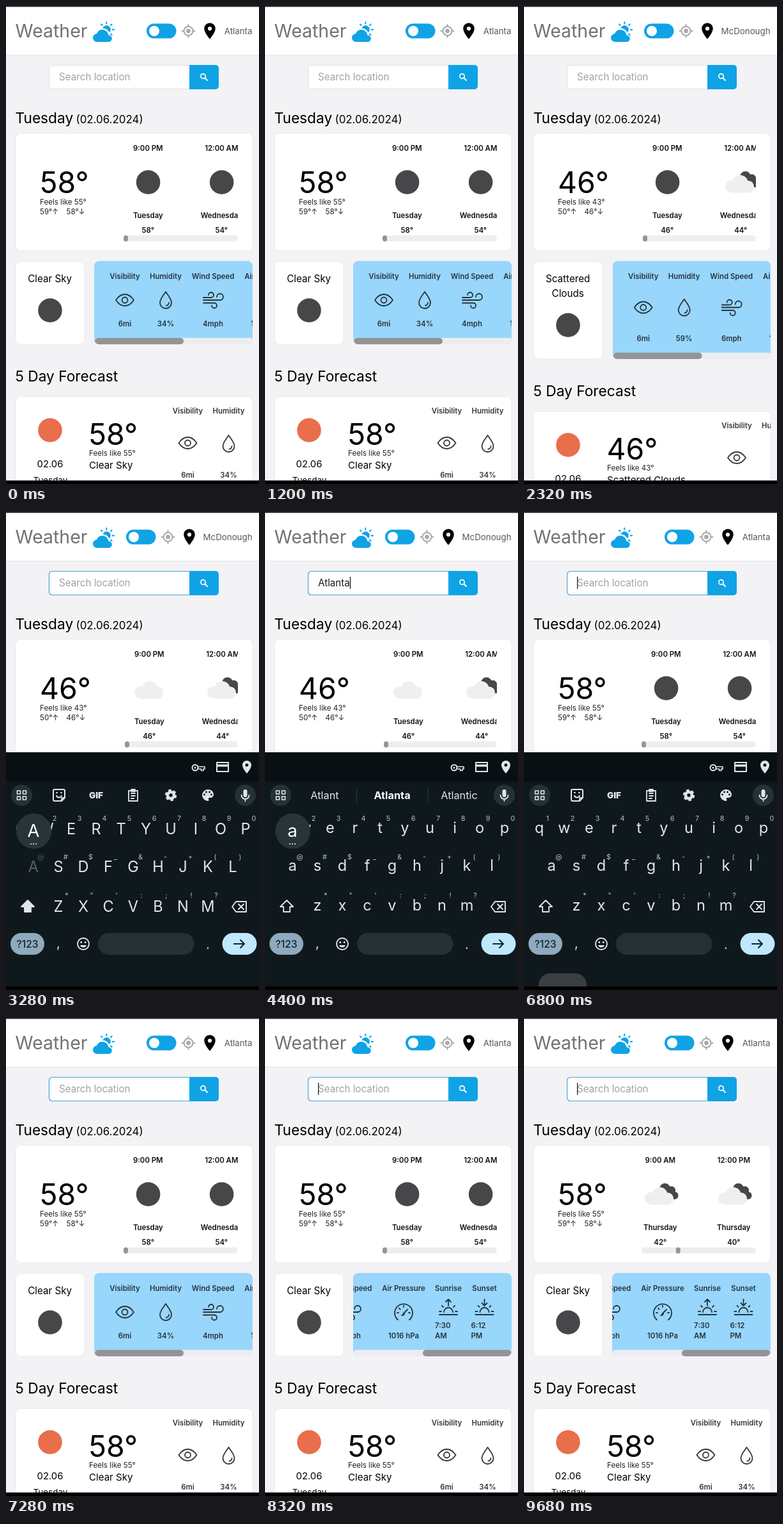
These frames come from a looping animation (396x746 px, 9.76 s). An HTML page:

```html
<!DOCTYPE html>
<html lang="en">
<head>
<meta charset="utf-8">
<title>Weather</title>
<style>
  html, body { margin: 0; width: 100%; height: 100%; overflow: hidden; background: #f3f2f5; }
  svg { display: block; width: 100%; height: 100%; }
  text { font-family: Inter, sans-serif; }
  .mid, .kb text { text-anchor: middle; }
  .bold { text-anchor: middle; font-weight: 600; font-size: 11.4px; }
  .line { fill: none; stroke-linecap: round; stroke-linejoin: round; }
</style>
</head>
<body>
<svg id="stage" viewBox="0 0 396 746"></svg>
<script>
const LOOP = 9760, BLUE = '#0fa3e6', DARK = '#47474a', INK = '#e1e7e9';
const stage = document.getElementById('stage');
const pen = document.createElement('canvas').getContext('2d');

const clamp = v => Math.max(0, Math.min(1, v));
const easeOut = p => 1 - (1 - clamp(p)) ** 2;
const between = (t, a, b) => t >= a && t < b;

// Markup helpers
const text = (x, y, s, size, more = '') => `<text x="${x}" y="${y}" font-size="${size}" ${more}>${s}</text>`;
const mid = (x, y, s, size, more = '') => text(x, y, s, size, 'class="mid" ' + more);
const bold = (x, y, s, fill = '#111') => `<text class="bold" x="${x}" y="${y}" fill="${fill}">${s}</text>`;
const rect = (x, y, w, h, r, fill, more = '') =>
  `<rect x="${x}" y="${y}" width="${w}" height="${h}" rx="${r}" fill="${fill}" ${more}/>`;
const dot = (x, y, r, fill, more = '') => `<circle cx="${x}" cy="${y}" r="${r}" fill="${fill}" ${more}/>`;
const ring = (x, y, r, color, width) => dot(x, y, r, 'none', `stroke="${color}" stroke-width="${width}"`);
const at = (x, y, body, scale = 1) => `<g transform="translate(${x} ${y}) scale(${scale})">${body}</g>`;
const line = (d, color, width = 1.8) => `<path class="line" d="${d}" stroke="${color}" stroke-width="${width}"/>`;
const fill = (d, color) => `<path d="${d}" fill="${color}" fill-rule="evenodd"/>`;
const clip = (id, x, y, w, h, r, body) =>
  `<clipPath id="${id}">${rect(x, y, w, h, r, '#000')}</clipPath><g clip-path="url(#${id})">${body}</g>`;
const card = (x, y, w, h) => rect(x, y, w, h, 8, '#fff', 'stroke="#e6e6ea" stroke-width=".8"');

const PIN = 'M12 2C8.1 2 5 5.1 5 9c0 5.3 7 13 7 13s7-7.7 7-13c0-3.9-3.1-7-7-7zm0 9.5a2.5 2.5 0 1 1 0-5 2.5 2.5 0 0 1 0 5z';
const SUN = 'M-14 11H14M-7 7A7 7 0 0 1 7 7M-14 6h3M14 6h-3M-10-3l2 2M10-3l-2 2';
const glyphs = {
  eye: 'M-14 0Q-8-9 0-9T14 0Q8 9 0 9T-14 0ZM-4.5 0a4.5 4.5 0 1 0 9 0a4.5 4.5 0 1 0-9 0',
  drop: 'M0-13C3-8 9-2 9 4A9 9 0 0 1-9 4C-9-2-3-8 0-13ZM5 4A5 5 0 0 1 1 8.5',
  wind: 'M-15-4H-3a4 4 0 1 0-4-4M-15 0H11a5 5 0 1 0-5-5M-15 4.5H2a4 4 0 1 1-4 4',
  gauge: 'M-9 12A14 14 0 1 1 9 12M-1 3L6-4M-10 1h2M8 1h2M0-10v2M-7-6l1.5 1.5M-3 5a3 3 0 0 0 4-3',
  rise: SUN + 'M0-3V-13M-4-9L0-13L4-9',
  set: SUN + 'M0-13V-3M-4-7L0-3L4-7'
};
const glyph = (name, x, y, color) => at(x, y, line(glyphs[name], color));

const lightCloud = dot(-15, 6.5, 9.5, '#efeff0') + dot(-1, 1, 12, '#efeff0') + dot(11, 7, 9.5, '#efeff0')
  + rect(-15, 5, 26, 11.5, 0, '#efeff0');
const sky = {
  night: dot(0, 0, 18.8, DARK),
  sun: dot(0, 0, 18.8, '#e96e4b'),
  cloud: at(1, 0, lightCloud),
  broken: dot(7, -8.5, 8.5, DARK) + dot(17, -6, 6.5, DARK) + dot(22, 2, 6, DARK) + rect(7, -3, 15, 11, 0, DARK)
    + lightCloud
};

const atlanta = {
  name: 'Atlanta', temp: 58, feels: 55, hi: 59, lo: 58, sky: ['Clear Sky'], hum: 34, wind: 4,
  headX: 0, hourX: 222.3, detailX: 0, grow: 0, visX: 284.5,
  temps: [58, 54, 50, 47, 49, 56, 60, 58, 53, 49, 46, 44, 42, 40, 43],
  hourSky: i => i < 3 ? 'night' : i < 8 ? 'sun' : i < 10 ? 'cloud' : 'broken'
};
const mcdonough = {
  name: 'McDonough', temp: 46, feels: 43, hi: 50, lo: 46, sky: ['Scattered', 'Clouds'], hum: 59, wind: 6,
  headX: -32, hourX: 224.3, detailX: .7, grow: 23, visX: 333,
  temps: [46, 44], hourSky: i => i ? 'broken' : 'cloud'
};

function header(c) {
  const gray = '#a9a9ad';
  return rect(0, 0, 396, 76, 0, '#fff') + rect(0, 76, 396, 1, 0, '#e5e5e9')
    + text(14.5, 49, 'Weather', 28.5, 'fill="#717176"')
    + at(136, 22, fill('M11.473 11a4.5 4.5 0 0 0-8.72-.99A3 3 0 0 0 3 16h8.5a2.5 2.5 0 0 0 0-5z', BLUE)
      + fill('M7.2 6a3 3 0 1 1 4.8 3.2A5.4 5.4 0 0 0 7.2 6z', BLUE)
      + line('M10 1.5v1M13.9 3.1l-.7.7M6.1 3.1l.7.7M14.5 7h1M13.2 10.2l.7.7', BLUE, 1), 2.13)
    + at(c.headX, 0, rect(220, 27.5, 46.5, 23, 11.5, BLUE) + dot(232, 39, 8, '#fff')
      + ring(285.5, 39, 7, gray, 2) + dot(285.5, 39, 3.4, gray)
      + line('M285.5 29v2.5M285.5 46.5v2.5M275.5 39h2.5M293 39h2.5', gray, 2)
      + at(304, 24, fill(PIN, '#000'), 1.25))
    + text(385.5, 43.5, c.name, 13.3, 'text-anchor="end" fill="#58585d"');
}

function search(t, typed) {
  const toggles = [2560, 3040, 3350, 5440, 6160, 7280, 7680, 8000, 8320, 8880, 9360];
  let out = rect(67.5, 92.5, 265, 37, 5, '#fff', 'stroke="#e4e0de"')
    + fill('M287 92H328a5 5 0 0 1 5 5V125a5 5 0 0 1-5 5H287Z', BLUE)
    + ring(308.5, 109.5, 3.7, '#fff', 1.7) + line('M311.5 112.5L315 116', '#fff', 2);
  if (t >= 2560) out += line('M287 92.5H72.5a5 5 0 0 0-5 5V124.5a5 5 0 0 0 5 5H287', '#4aa6d6', 1.2);
  out += text(83, 116, typed || 'Search location', 15.2, `fill="${typed ? '#1c1c1f' : '#a2a2a8'}"`);
  if (toggles.filter(x => x <= t).length % 2) {
    pen.font = '15.2px Inter, sans-serif';
    out += rect(83 + pen.measureText(typed).width, 101, 1.2, 19, 0, '#111');
  }
  return out;
}

function hours(c, scroll, skyAt) {
  const days = ['Tuesday', 'Wednesday', 'Thursday'];
  const left = c.hourX - 38.3;
  const items = c.temps.map((temp, i) => {
    const x = c.hourX + 115 * i - scroll, h = (21 + 3 * i) % 24;
    if (x < 120 || x > 430) return '';
    return bold(x, 225.5, `${h % 12 || 12}:00 ${h < 12 ? 'AM' : 'PM'}`) + at(x + .3, 275, sky[skyAt(i)])
      + bold(x, 331, days[Math.floor((21 + 3 * i) / 24)]) + bold(x, 354, temp + '°');
  }).join('');
  return clip('hours', left, 199, 363 - left, 182, 0, items)
    + rect(left, 358, 362.5 - left, 9.5, 4, '#eeeeef')
    + rect(left + scroll * 178 / 4600, 358, 7, 9.5, 3.5, '#949497');
}

function details(c, scroll) {
  const ink = '#26343d', g = c.grow, icon = 459 + g / 2, base = 499.5 + g;
  const column = (x, title, name, value) => bold(x, 425.5, title, ink)
    + glyph(name, x, icon, ink) + bold(x, base, value, ink);
  const clock = (x, title, name, lines) => bold(x, 425.5, title, ink) + glyph(name, x, icon - 7, ink)
    + lines.map((s, i) => text(x - 21, 484 + g + 15.5 * i, s, 11.4, `font-weight="600" fill="${ink}"`)).join('');
  const left = 138 + c.detailX;
  return clip('details', left, 398, 386 - left, 130 + g, 8,
    rect(left, 398, 250, 160, 0, '#98d6fc') + at(c.detailX - scroll, 0,
      column(186, 'Visibility', 'eye', '6mi') + column(250, 'Humidity', 'drop', c.hum + '%')
      + column(324, 'Wind Speed', 'wind', c.wind + 'mph') + column(407, 'Air Pressure', 'gauge', '1016 hPa')
      + clock(477, 'Sunrise', 'rise', ['7:30', 'AM']) + clock(533.5, 'Sunset', 'set', ['6:12', 'PM']))
    + rect(left, 518 + g, 250, 10, 5, '#ecedf0')
    + rect(left + 1 + scroll * .568, 518 + g, 139, 10, 5, '#949497'));
}

function forecast(c) {
  const ink = '#36363a', humX = c.visX + 64;
  return at(0, c.grow, text(14.5, 586, '5 Day Forecast', 22.7) + card(15, 609.5, 371, 180)
    + at(69, 662, sky.sun) + mid(69, 720, '02.06', 14.9) + mid(69.5, 745, 'Tuesday', 13.4)
    + text(129.5, 684.5, c.temp + '°', 46.4) + text(130, 702, `Feels like ${c.feels}°`, 11.6, 'fill="#222"')
    + text(130, 722, c.sky.join(' '), 15.1)
    + clip('forecast', 15, 609, 371, 180, 8,
      bold(c.visX, 636, 'Visibility', ink) + glyph('eye', c.visX, 682, ink) + bold(c.visX, 736, '6mi', ink)
      + bold(humX, 636, 'Humidity', ink) + glyph('drop', humX, 683, ink) + bold(humX, 736, c.hum + '%', ink)));
}

function page(t, typed) {
  const c = between(t, 2320, 5680) ? mcdonough : atlanta;
  // The first icon arrives a moment after the new numbers
  const skyAt = i => !i && t < 2560 ? 'night' : c.hourSky(i);
  return rect(0, 0, 396, 746, 0, '#f3f2f5') + header(c) + search(t, typed)
    + text(14.5, 183, 'Tuesday', 22.7) + text(109.5, 183, '(02.06.2024)', 16.9)
    + card(15, 198.5, 371, 183.5)
    + text(53, 291.5, c.temp + '°', 46.4) + text(53, 310, `Feels like ${c.feels}°`, 11.6, 'fill="#222"')
    + text(53, 325, c.hi + '°↑', 11.6, 'fill="#222"') + text(94.5, 325, c.lo + '°↓', 11.6, 'fill="#222"')
    + hours(c, 1389 * easeOut((t - 8600) / 1060), skyAt)
    + card(15, 399, 108, 129 + c.grow)
    + c.sky.map((s, i) => mid(68.7, 430.5 + 23 * i, s, 15.2)).join('') + at(69, 475 + c.grow, sky[skyAt(0)])
    + details(c, 190 * easeOut((t - 7960) / 340)) + forecast(c);
}

// Keyboard
const rows = [
  { keys: 'qwertyuiop', x: 24, y: 503, marks: [...'1234567890'], markX: 13, markY: 481.5 },
  { keys: 'asdfghjkl', x: 43, y: 562, marks: ['@', '#', '$', '_', '&amp;', '-', '+', '(', ')'], markX: 11.5, markY: 541.5 },
  { keys: 'zxcvbnm', x: 82, y: 623.5, marks: ['*', '"', "'", ':', ';', '!', '?'], markX: 13, markY: 602 }
];
const word = 'Atlanta', presses = [3270, 3520, 3680, 3840, 3960, 4080, 4310];
const guesses = [['As', 'A', 'And'], ['Att', 'At', 'Attach'], ['Atl', 'Atlas', 'Atlantic'], ['Atla', 'Atlas', 'Atlantic'],
  ['Atlan', 'Atlanta', 'Atlantic'], ['Atlant', 'Atlanta', 'Atlantic'], ['Atlant', 'Atlanta', 'Atlantic']];

const bubble = x => dot(x, 442, 16.5, '#263136');
const tools = () =>
  at(83, 442, line('M4 9H-7a2 2 0 0 1-2-2V-7a2 2 0 0 1 2-2H7a2 2 0 0 1 2 2V4ZM4 9V6a2 2 0 0 1 2-2H9M-4 1a4.5 4.5 0 0 0 8 0M-4-4h1M3-4h1', INK, 2))
  + text(141, 447, 'GIF', 13.5, `font-weight="900" fill="${INK}"`)
  + at(199, 442, line('M-7-7H7V9H-7ZM-3-3H3M-3 1H3M-3 5H1', INK, 1.8) + rect(-4, -10, 8, 5, 1.5, INK))
  + at(258, 442, ring(0, 0, 5, INK, 4.5)
    + dot(0, 0, 7.8, 'none', `stroke="${INK}" stroke-width="2.8" stroke-dasharray="4.4 3.77"`))
  + at(304, 430, fill('M12 3a9 9 0 0 0 0 18c.8 0 1.5-.7 1.5-1.5 0-.4-.2-.7-.4-1-.2-.3-.4-.6-.4-1 0-.8.7-1.5 1.5-1.5H16c2.8 0 5-2.2 5-5 0-4.4-4-8-9-8z', INK)
    + [[6.5, 11], [9.5, 7], [14.5, 7], [17.5, 11]].map(([x, y]) => dot(x, y, 1.5, '#0f191d')).join(''));
const suggest = words => words.map((w, i) => text([93.5, 199, 304][i], 448, w, 16.3,
  `fill="${i === 1 ? '#fff' : INK}" font-weight="${i === 1 ? 700 : 400}"`)).join('')
  + rect(143, 431, 1, 23, 0, '#2d383d') + rect(255, 431, 1, 23, 0, '#2d383d');

function keyboard(t, typed) {
  const caps = t < 3350, cased = k => caps ? k.toUpperCase() : k;
  const last = presses.filter(p => p <= t).length - 1, age = t - presses[last];
  const pressed = age < 250 ? word[last].toLowerCase() : '';
  let popup = '';
  const letters = rows.map(r => [...r.keys].map((k, i) => {
    const x = r.x + 39 * i, dim = k === pressed && age < 80 ? 'opacity=".35"' : '';
    if (k === pressed) popup = dot(x + .5, r.y - 64, 27.5, '#29333a')
      + text(x, r.y - 55, cased(k), 27.5, 'fill="#fff"')
      + [-4, 0, 4].map(d => dot(x + d, r.y - 44, 1.1, INK)).join('');
    return `<g ${dim}>` + text(x, r.y - (caps ? 0 : 2), cased(k), 23.6, `fill="${INK}"`)
      + text(x + r.markX, r.markY, r.marks[i], 10.8, 'fill="#b9c2c6"') + '</g>';
  }).join('')).join('');
  const enter = between(t, 4560, 4800) ? '#95bfd6' : '#bfe8fd';
  return rect(0, 375, 396, 371, 0, '#0f191d') + rect(0, 375, 396, 46, 0, '#081014')
    + at(301, 399, ring(-5, 0, 4.5, INK, 2) + dot(-5, 0, 1.5, INK)
      + line('M0-1.5H10V2H8V4.5H4.5V2H0', INK, 1.7))
    + at(339, 398, line('M-9-7H9V7H-9Z', INK, 2) + rect(-9, -4, 18, 3.5, 0, INK))
    + at(365, 386, fill(PIN, INK))
    + bubble(24.5) + at(24.5, 442, line('M-7-7h5v5h-5ZM2-7h5v5h-5ZM-7 2h5v5h-5ZM2 2h5v5h-5Z', INK, 1.6))
    + bubble(374.5) + at(374.5, 442, rect(-3, -9, 6, 12, 3, INK) + line('M-6 0a6 6 0 0 0 12 0M0 6V9', INK, 1.8))
    + (typed ? suggest(guesses[typed.length - 1]) : tools()) + letters
    + at(34, 616, `<path d="M0-10L10 0H5V8H-5V0H-10Z" fill="${caps ? INK : 'none'}" stroke="${INK}" stroke-width="1.8" stroke-linejoin="round"/>`)
    + at(365, 616, line('M-5-8H11V8H-5L-11 0ZM-1-4L7 4M7-4L-1 4', INK, 1.9))
    + rect(7, 657, 53, 34, 17, '#8fa9be') + text(33.5, 679.5, '?123', 15.6, 'font-weight="500" fill="#14242e"')
    + text(82, 680, ',', 20, `fill="${INK}"`) + text(316, 682, '.', 20, `fill="${INK}"`)
    + at(121, 674, ring(0, 0, 9, INK, 1.9) + dot(-3.2, -2.5, 1.5, INK)
      + dot(3.2, -2.5, 1.5, INK) + fill('M-5 2H5a5.3 5.3 0 0 1-10 0Z', INK))
    + rect(144, 657, 150.5, 34, 17, '#262f35')
    + rect(338.5, 657, 54, 34, 17, enter) + line('M357 674H373M367 668L373 674L367 680', '#12222b', 2)
    + popup;
}

function frame(t) {
  const typed = t < 4880 ? word.slice(0, presses.filter(p => p + 80 <= t).length) : '';
  const shown = easeOut((t - 2700) / 340) - easeOut((t - 6880) / 240);
  return page(t, typed)
    + (shown > 0 ? `<g class="kb" transform="translate(0 ${371 * (1 - shown)})">${keyboard(t, typed)}</g>` : '')
    + (between(t, 6790, 6960) ? rect(23, 720, 75, 50, 18, '#3b3f43') : '')
    + rect(0, 0, 396, 1.3, 0, '#161618') + rect(0, 740.5, 396, 6, 0, '#000');
}

const start = performance.now();
let current = '';
function tick() {
  const markup = frame((performance.now() - start) % LOOP);
  if (markup !== current) stage.innerHTML = current = markup;
  requestAnimationFrame(tick);
}
tick();
</script>
</body>
</html>
```
